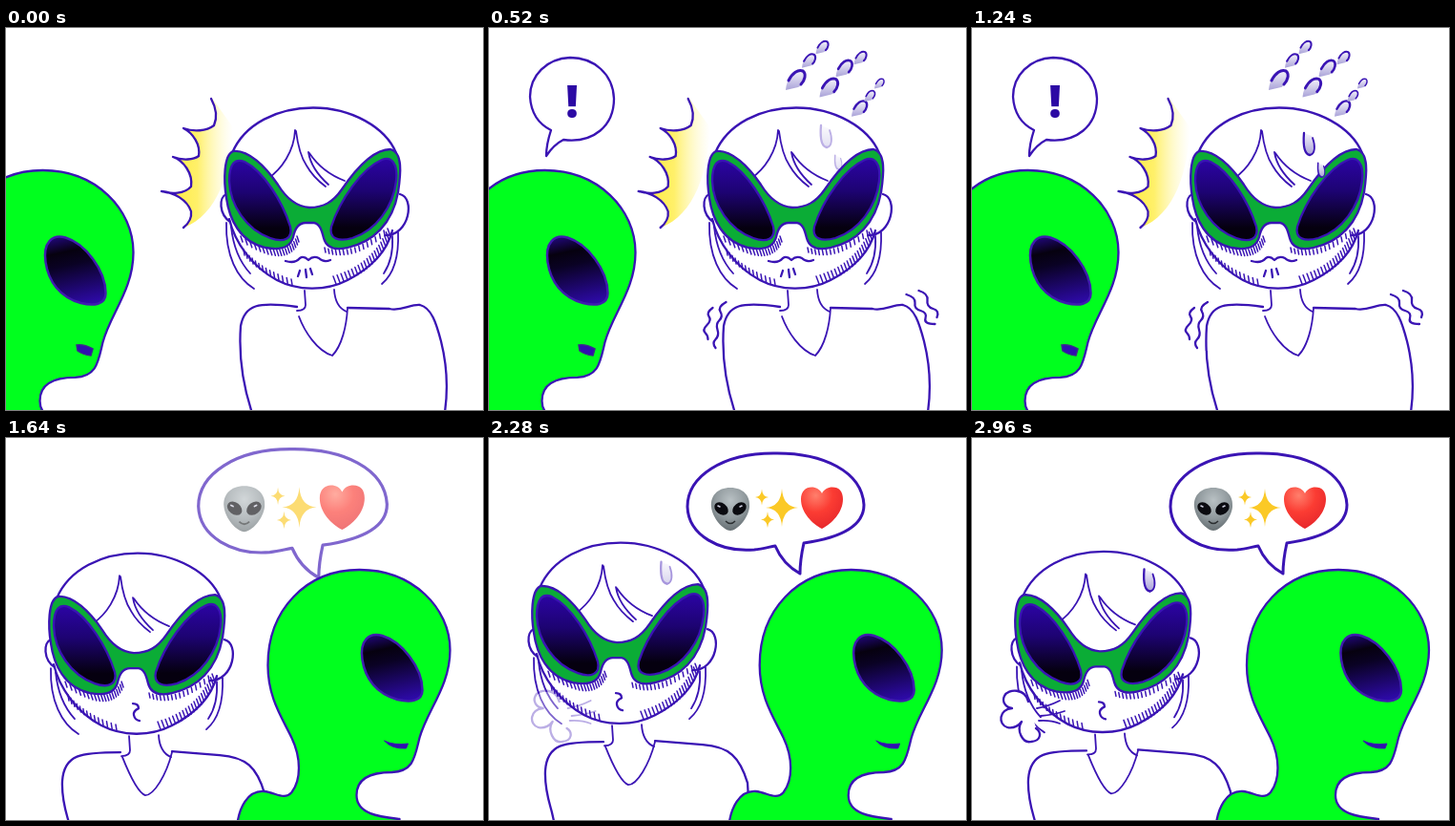
Recreate the animation shown at these times as an HTML page. Size 500x400 px, loop 3000 ms.

```html
<!DOCTYPE html>
<html lang="en">
<head>
<meta charset="utf-8">
<title>Alien greeting</title>
<style>
html, body { margin: 0; width: 100%; height: 100%; overflow: hidden; background: #fff; }
svg { display: block; width: 500px; height: 400px; }
.ink { fill: none; stroke: #3a14b4; stroke-width: 2.3; stroke-linecap: round; stroke-linejoin: round; }
.thin { stroke-width: 1.8; }
.bold { stroke-width: 3; }
.white { fill: #fff; }
.bang { font: 800 47px "Open Sans", "Noto Sans", sans-serif; fill: #2c0aa4; text-anchor: middle; }
</style>
</head>
<body>
<svg viewBox="0 0 500 400">
  <defs>
    <linearGradient id="lens" x1=".5" y1="0" x2=".5" y2="1">
      <stop offset="0" stop-color="#2c04a4"/><stop offset=".4" stop-color="#1d0372"/><stop offset=".85" stop-color="#05000f"/><stop offset="1" stop-color="#05000f"/>
    </linearGradient>
    <linearGradient id="eye" x1=".4" y1="0" x2=".6" y2="1">
      <stop offset="0" stop-color="#1c0668"/><stop offset=".2" stop-color="#06010f"/><stop offset=".4" stop-color="#0a0224"/><stop offset="1" stop-color="#2d0aa6"/>
    </linearGradient>
    <linearGradient id="flash">
      <stop offset="0" stop-color="#ffea30"/><stop offset=".5" stop-color="#fff06a"/><stop offset="1" stop-color="#fff8b8" stop-opacity="0"/>
    </linearGradient>
    <linearGradient id="drip" x1="0" y1="0" x2="0" y2="1">
      <stop offset="0" stop-color="#f4f2fb"/><stop offset="1" stop-color="#a9a2d8"/>
    </linearGradient>
    <radialGradient id="skin" cx=".5" cy=".3" r=".7">
      <stop offset="0" stop-color="#b9c1c4"/><stop offset=".6" stop-color="#8f989c"/><stop offset="1" stop-color="#666f73"/>
    </radialGradient>
    <radialGradient id="red" cx=".35" cy=".2" r=".9">
      <stop offset="0" stop-color="#ff7f6c"/><stop offset=".45" stop-color="#fb3c33"/><stop offset="1" stop-color="#e3242a"/>
    </radialGradient>

    <g id="head" class="ink">
      <path class="white" stroke="none" d="M237 131C250 100 285 84 322 84C362 84 398 104 408 131L404 212C400 232 385 250 358 264C335 276 305 275 284 264C258 250 240 225 234 200Z"/>
      <path d="M237 131C250 100 285 83.5 322 83.5C362 83.5 398 104 409 131"/>
      <path d="M231 174C223 177 223 195 235 203M413 174C429 178 423 217 398 217"/>
      <path d="M234 200C240 225 258 250 284 264C305 275 335 276 358 264C385 250 400 232 405 212"/>
      <path class="thin" d="M231 204C230 238 242 262 260 273M236 208C238 228 244 244 256 257M411 214C412 240 406 258 394 268M405 218C406 234 402 248 396 257"/>
      <path class="thin" d="M303 107C302 129 289 148 274 158M304 108C306 124 309 135 315 144C320 153 327 160 335 166M317 130C319 143 328 155 338 164M318 131C328 146 342 155 355 160"/>
      <path class="hatch" stroke-width="1.5"/>
      <path class="thin" d="M313 275L314 290Q314 296 305 296M344 274Q345 292 357 297"/>
      <path fill="#0bac36" d="M238 129C228 133 228 160 231 178C234 200 245 224 272 230C288 233 298 230 301 219C303 209 307 204 314 204L323 204C329 205 331 212 333 220C336 231 345 233 358 230C385 224 405 205 411 172C414 152 416 130 403 127C385 127 367 147 352 169C343 182 333 188 318 188C303 187 293 177 285 164C272 145 254 127 238 129Z"/>
      <path fill="url(#lens)" d="M234 160C234 142 240 136 250 140C270 150 290 182 298 208C301 221 291 225 277 220C252 211 235 186 234 160Z"/>
      <path fill="url(#lens)" d="M409 160C411 142 404 134 394 138C373 147 350 180 341 208C338 221 349 224 363 220C388 212 406 187 409 160Z"/>
    </g>

    <path id="alienBody" class="ink" style="fill:#00ff1e" d="M255 415C256 385 268 369 284 370C296 371 305 380 313 371C323 358 323 335 313 314C303 293 288 272 288 238C288 180 328 138 384 138C440 138 479 178 479 222C479 260 455 285 447 314C442 334 441 349 418 350C396 350 381 356 381 374C381 395 408 397 426 399V415Z"/>
    <path id="alienEye" fill="url(#eye)" stroke="#3f1cae" stroke-width="2.5" d="M387 232C384 212 394 203 408 207C428 213 450 240 450 264C450 276 437 277 424 274C402 268 390 252 387 232Z"/>
    <g id="sweat" class="ink">
      <path style="fill:url(#drip)" stroke="none" d="M-5 -12C-6 0 -5 10 1 11C7 10 7 0 3 -9Z"/>
      <path d="M-5 -12C-6 0 -5 10 1 11"/><path class="thin" d="M1 11C7 10 7 1 4 -7"/>
    </g>
    <g id="bead">
      <path fill="url(#drip)" d="M-10 11C-9 -3 0 -11 8 -9C13 -3 8 6 3 8Z"/>
      <path class="ink bold" d="M-7 1C-3 -7 3 -11 8 -9C12 -6 10 1 6 5"/>
    </g>
    <path id="spark" d="M0 -1Q.06 -.06 1 0Q.06 .06 0 1Q-.06 .06 -1 0Q-.06 -.06 0 -1Z" fill="#fbc926"/>
  </defs>

  <g id="meet">
    <g id="burst">
      <path fill="url(#flash)" d="M215 72C221 85 221 95 218 102C210 108 197 109 186 105C196 110 204 122 202 134C197 138 185 139 175 135C186 139 196 152 194 166C187 174 173 174 163 171C176 172 190 180 194 192C195 200 191 205 186 209C222 196 236 150 238 104Z"/>
      <path class="ink" d="M215 74C221 85 221 95 218 102C210 108 197 109 186 105C196 110 204 122 202 134C197 138 185 139 175 135C186 139 196 152 194 166C187 174 173 174 163 171C176 172 190 180 194 192C195 200 191 205 186 209"/>
    </g>
    <use href="#head"/>
    <path class="ink thin" d="M307 302C313 318 326 338 342 343C352 333 357 312 358 293"/>
    <path class="ink" d="M305 292C264 286 250 290 246 312C244 340 248 372 257 400M358 293L402 294C414 297 424 289 434 290C446 293 451 309 456 328C462 352 464 374 460 402"/>
    <path class="ink" d="M293 244Q303 247 308 241Q312 238 317 243Q322 238 328 241Q333 246 340 243M308 254L306 260M314 253L315 261M319 252L321 258"/>
    <g id="beads"></g>
    <g id="brow">
      <use href="#sweat" transform="translate(353 122)"/>
      <use href="#sweat" transform="translate(366 149) scale(.65)"/>
    </g>
    <g id="shakeL" class="ink"><path d="M247 287Q238 292 241 297T240 306T238 316T236 326T236 335M233 293Q226 298 229 302T227 311T225 319T228 326"/></g>
    <g id="shakeR" class="ink"><path d="M439 279Q449 282 448 288T454 296T459 304T469 310M452 275Q462 278 461 285T467 294T471 303"/></g>
    <g id="visitor">
      <g transform="translate(-325.5 7.8) scale(1 1.023)"><use href="#alienBody"/><use href="#alienEye"/></g>
      <path fill="#2f0fb0" stroke="#3a2a8c" stroke-width="1.5" d="M94 332Q102 331 111 336L109 343Q100 342 95 338Z"/>
    </g>
    <g id="shout">
      <path class="ink white" style="fill:#fff" d="M78 117C110 121 131 102 131 74C130 48 110 31 85 31C60 32 43 50 43 72C44 88 51 100 65 107Q60 122 60 134Q68 122 78 117Z"/>
      <text class="bang" x="87" y="94">!</text>
    </g>
  </g>

  <g id="love">
    <g id="friend">
      <use href="#head"/>
      <path class="ink thin" d="M306 297C312 312 322 334 330 337C339 337 352 316 358 292"/>
      <path class="ink" d="M304 292C262 292 245 294 243 322C242 342 248 358 250 366L258 402M358 291L408 295C436 297 447 308 455 335L456 352"/>
      <path class="ink" d="M317 241q6 0 6 5q-6 3 -5 7q1 5 6 6"/>
    </g>
    <g id="worry"><use href="#sweat" transform="translate(185.5 149.5)"/></g>
    <g id="puff" class="ink">
      <path class="white" stroke="none" d="M58 274C55 262 38 262 34 270C31 276 35 282 41 283C28 284 26 300 37 303C44 305 50 300 52 297C46 306 53 320 63 318C72 317 72 307 67 303Z"/>
      <path d="M59 276C56 262 38 262 34 270C31 276 35 282 42 283C28 284 27 300 37 303C44 305 50 300 52 297C46 306 53 320 62 318C73 317 73 308 67 304"/>
      <path class="thin" d="M68 283Q80 281 92 275M72 291Q86 290 97 286M70 296Q82 295 92 299"/>
    </g>
    <g id="suitor">
      <use href="#alienBody"/><use href="#alienEye"/>
      <path fill="#2f0fb0" stroke="#3a14b4" d="M410 317Q420 322 435 320L433 325Q418 326 410 317Z"/>
    </g>
    <g id="speech">
      <path class="ink bold" style="fill:#fff" d="M330 110C372 104 393 90 393 70C391 35 350 15 298 16C245 16 208 40 208 72C209 102 242 120 278 117C287 116 294 114 300 113Q308 132 326 142Q326 128 330 110Z"/>
      <path fill="url(#skin)" d="M253 52C267 52 274 61 273 72C272 84 260 97 253 97C246 97 234 84 233 72C232 61 239 52 253 52Z"/>
      <g fill="#0b0b10">
        <ellipse cx="243.5" cy="74" rx="8" ry="5.8" transform="rotate(38 243.5 74)"/>
        <ellipse cx="262.5" cy="74" rx="8" ry="5.8" transform="rotate(-38 262.5 74)"/>
      </g>
      <path d="M248 87Q253 92 258 87" fill="none" stroke="#2a2e30" stroke-width="1.6"/>
      <path d="M240 71l2 1M265 71l-2 1" stroke="#ccd" stroke-width="1.6" stroke-linecap="round"/>
      <use href="#spark" transform="translate(307 73) scale(17 20)"/>
      <use href="#spark" transform="translate(286 62) scale(7 8.5)"/>
      <use href="#spark" transform="translate(292 85.5) scale(7 8.5)"/>
      <path fill="url(#red)" d="M349 95C339 90 327 78 327 64C327 56 332 51.5 338 51.5C343 51.5 347 54 349 58C351 54 355 51.5 360 51.5C367 51.5 371 56 371 64C371 78 359 90 349 95Z"/>
    </g>
  </g>
</svg>
<script>
const LOOP = 3000, STEP = 40, CUT = 1520;
const $ = id => document.getElementById(id);
const clamp = v => Math.max(0, Math.min(1, v));
const progress = (t, start, length) => clamp((t - start) / length);
const easeOut = p => Math.sin(p * Math.PI / 2);
const easeInOut = p => (1 - Math.cos(p * Math.PI)) / 2;

function place(id, x, y, opacity = 1) {
  $(id).setAttribute("transform", `translate(${x} ${y})`);
  $(id).setAttribute("opacity", opacity);
}

function zoom(id, cx, cy, scale, opacity = 1, dx = 0) {
  $(id).setAttribute("transform", `translate(${cx + dx} ${cy}) scale(${scale}) translate(${-cx} ${-cy})`);
  $(id).setAttribute("opacity", opacity);
}

// Short strokes (dx, dy) spread along a quadratic curve.
function hatch([ax, ay], [bx, by], [cx, cy], count, dx, dy) {
  let d = "";
  for (let i = 0; i <= count; i++) {
    const u = i / count, v = 1 - u;
    const x = v * v * ax + 2 * u * v * bx + u * u * cx;
    const y = v * v * ay + 2 * u * v * by + u * u * cy;
    d += `M${x.toFixed(1)} ${y.toFixed(1)}l${dx} ${dy}`;
  }
  return d;
}

document.querySelector(".hatch").setAttribute("d",
  hatch([246, 218], [292, 247], [305, 218], 18, 2, 6) +
  hatch([250, 238], [268, 259], [300, 269], 13, -1, -6) +
  hatch([346, 268], [388, 256], [403, 218], 20, -3, -8) +
  hatch([334, 230], [362, 240], [396, 212], 15, 1, 5));

$("beads").innerHTML = [
  [321, 54, 1], [335, 34, .7], [349, 20, .65],
  [356, 62, .95], [372, 42, .85], [389, 31, .65],
  [388, 84, .8], [399, 71, .55], [409, 58, .5]
].map(([x, y, s]) => `<use href="#bead" transform="translate(${x} ${y}) scale(${s})"/>`).join("");

function pop(id, cx, cy, t, start) {
  const p = progress(t, start, 280);
  zoom(id, cx, cy, 1 + .12 * (1 - p), clamp(1.5 * p));
}

function drawMeet(t) {
  place("visitor", -20 * (1 - easeOut(progress(t, 0, 520))), 0);
  const pulse = Math.sin(Math.PI * progress(t, 560, 560));
  zoom("burst", 214, 141, 1 + .3 * pulse, 1, -9.5 * easeOut(progress(t, 0, 1120)));
  pop("shout", 87, 80, t, 120);

  const rise = progress(t, 160, 280);
  place("beads", -4 * (1 - rise), 8 * (1 - rise), rise);
  const drip = progress(t, 400, 360);
  place("brow", 0, -12 * (1 - drip), drip);

  const shown = progress(t, 240, 240);
  const shake = t < 1240 ? 1.5 * Math.sin(t / 160 * 2 * Math.PI) : 0;
  place("shakeL", shake, 0, shown);
  place("shakeR", -shake, 0, shown);
}

function drawLove(t) {
  const lift = t < 2200
    ? easeInOut(progress(t, CUT, 680))
    : 1 - easeInOut(progress(t, 2200, 1100));
  place("friend", -184, 38 - 12 * lift);
  place("suitor", -15.5 * (1 - easeOut(progress(t, CUT, LOOP - CUT))), 0);
  pop("speech", 300, 79, t, CUT);

  const drip = progress(t, 2120, 360);
  place("worry", 0, -14 * (1 - drip), drip);
  place("puff", .0215 * (2960 - t), 0, progress(t, 2040, 700));
}

function render(time) {
  const t = Math.floor(time % LOOP / STEP) * STEP;
  const meeting = t < CUT;
  $("meet").style.display = meeting ? "" : "none";
  $("love").style.display = meeting ? "none" : "";
  (meeting ? drawMeet : drawLove)(t);
}

function tick() {
  render(performance.now());
  requestAnimationFrame(tick);
}
tick();
</script>
</body>
</html>
```
